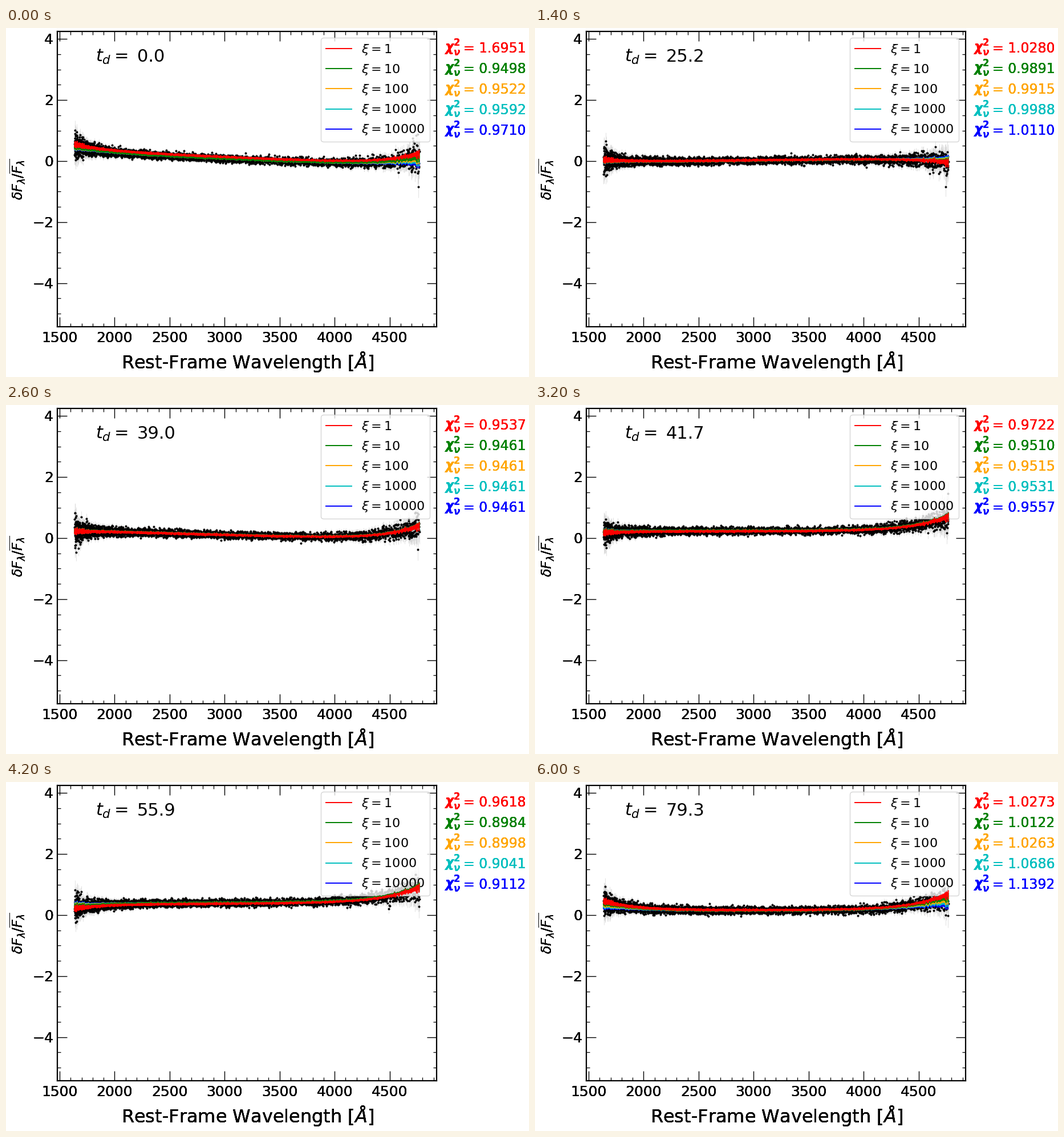
Recreate the animation shown at these times as a matplotlib script. Size 917 by 611 pixels, loop 6.2 s.

```python
import numpy as np
import matplotlib.pyplot as plt
from matplotlib.animation import FuncAnimation
from matplotlib.ticker import MultipleLocator

W, H, DPI = 917, 611, 100
FRAMES, STEP_MS = 31, 200
COLORS = ["red", "green", "orange", "c", "blue"]
LO, HI = 1637, 4770

wave = np.geomspace(LO, HI, 4640)
centred = 2 * (wave - LO) / (HI - LO) - 1


def blue_end(scale):
    return np.exp((LO - wave) / scale)


def red_end(scale):
    return np.exp((wave - HI) / scale)


def ease(i, *points):
    """Cosine-eased path through (step, value) points."""
    steps, values = zip(*points)
    pos = np.interp(i, steps, range(len(steps)))
    n = int(min(pos, len(steps) - 2))
    mix = (1 - np.cos(np.pi * (pos - n))) / 2
    return values[n] + mix * (values[n + 1] - values[n])


def counter(i, *values):
    return np.interp(i, [0, 7, 13, 16, 21, 25, 30], values)


def days(i):
    return counter(i, 0, 25.2, 39.0, 41.7, 55.9, 66.0, 79.3)


def chi_values(i):
    """Red, green and blue are counted; the others lie between."""
    first = counter(i, 1.6951, 1.0280, 0.9537, 0.9722, 0.9618, 1.1050, 1.0273)
    best = counter(i, 0.9498, 0.9891, 0.9461, 0.9510, 0.8984, 0.9207, 1.0122)
    last = counter(i, 0.9710, 1.0110, 0.9461, 0.9557, 0.9112, 0.9235, 1.1392)
    return [first] + [best + (last - best) * (k / 3) ** 2 for k in range(4)]


def red_model(i):
    level = ease(i, (0, 0.1), (10, 0.02), (21, 0.375), (30, 0.16))
    tilt = ease(i, (0, -0.25), (7, 0.07), (13, -0.16), (17, 0.03), (30, 0))
    left = ease(i, (0, 0.2), (13, -0.02), (23, -0.15), (30, 0.3))
    right = ease(i, (0, 0.4), (7, -0.15), (13, 0.48), (20, 0.48),
                 (25, 0.8), (30, 0.53))
    return (level + tilt * centred + left * blue_end(280)
            + right * red_end(330))


def spread(i):
    """Shift common to all other models, and the fan at both ends."""
    mid = ease(i, (0, -0.05), (9, 0), (22, 0.03), (30, -0.01))
    left = ease(i, (0, -0.05), (13, 0), (22, 0.1), (30, -0.16))
    right = ease(i, (0, -0.27), (7, 0.13), (14, 0), (25, 0), (30, -0.33))
    return mid, left * blue_end(250) + right * red_end(230)


sigma = (0.055 + 0.13 * blue_end(60) + 0.06 * blue_end(250)
         + 0.12 * red_end(60) + 0.13 * red_end(330))
ripple = np.random.default_rng(5).normal(size=wave.size) * (
    0.015 + 0.045 * blue_end(80) + 0.045 * red_end(120))

fig = plt.figure(figsize=(W / DPI, H / DPI), dpi=DPI, facecolor="white")
L, R, T, B = 90, 754.5, 6, 523
ax = fig.add_axes([L / W, 1 - B / H, (R - L) / W, (B - T) / H])
ax.set_xlim(1479.3, 4925)
ax.set_ylim(-5.43, 4.25)
ax.xaxis.set_major_locator(MultipleLocator(500))
ax.xaxis.set_minor_locator(MultipleLocator(100))
ax.yaxis.set_major_locator(MultipleLocator(2))
ax.yaxis.set_minor_locator(MultipleLocator(0.5))
ax.tick_params(which="both", direction="in", top=True, right=True,
               labelbottom=False, labelleft=False)
ax.tick_params(which="major", length=12, width=1)
ax.tick_params(which="minor", length=4, width=0.9)
for spine in ax.spines.values():
    spine.set_linewidth(1.6)


def label(x, y, s, size, copies=4, **kw):
    """Text at a pixel position, overprinted to look heavier."""
    kw.setdefault("va", "baseline")
    return [fig.text(x / W, 1 - y / H, s, fontsize=size, **kw)
            for _ in range(copies)]


for x in range(1500, 4501, 500):
    label(94 + (x - 1500) * 0.19283, 550, str(x), 18, ha="center")
for y in range(-4, 5, 2):
    label(83, 242 - y * 53.4, str(y).replace("-", "\u2212"), 18, ha="right")
label(423.5, 596, r"Rest-Frame Wavelength [$\AA$]", 23, ha="center")
label(21, 264.5, r"$\delta F_\lambda/\overline{F_\lambda}$", 17,
      ha="center", va="center", rotation=90)
label(157, 59, r"$t_d=$", 22, copies=1)
day_text, = label(229.5, 59, "", 22, copies=1)

chi_text = []
for k, color in enumerate(COLORS):
    y = 43 + 35.9 * k
    label(768, y, r"$\mathbfit{\chi}^{\mathbf{2}}_{\mathbfit{\nu}}$", 17,
          copies=2, color=color)
    chi_text.append(label(802, y, "", 17, color=color))

bars = ax.vlines(wave, 0 * wave, 0 * wave, color="lightgray", lw=0.8,
                 alpha=0.6, zorder=1)
dots, = ax.plot(wave, 0 * wave, "o", color="black", ms=2.4, mew=0.4, zorder=2)
models = [ax.plot(wave, 0 * wave, color=c, lw=1.4, zorder=12 - k,
                  label=rf"$\xi = {10 ** k}$")[0]
          for k, c in enumerate(COLORS)]
ax.legend(handles=models, loc="upper right", fontsize=16)


def update(i):
    base = red_model(i)
    mid, fan = spread(i)
    for k, line in enumerate(models):
        line.set_ydata(base + ripple + (k > 0) * mid + k / 4 * fan)

    noise = np.random.default_rng(100 + i).normal(size=wave.size)
    flux = base + mid + fan / 4 + sigma * noise
    dots.set_ydata(flux)
    low, high = (np.c_[wave, flux + s * 1.3 * sigma] for s in (-1, 1))
    bars.set_segments(np.stack([low, high], axis=1))

    day_text.set_text(f"{days(i):.1f}")
    for texts, chi in zip(chi_text, chi_values(i)):
        for t in texts:
            t.set_text(f"= {chi:.4f}")
    return []


anim = FuncAnimation(fig, update, frames=FRAMES, interval=STEP_MS,
                     init_func=lambda: update(0), repeat=True, repeat_delay=0,
                     blit=False)
plt.show()
```
